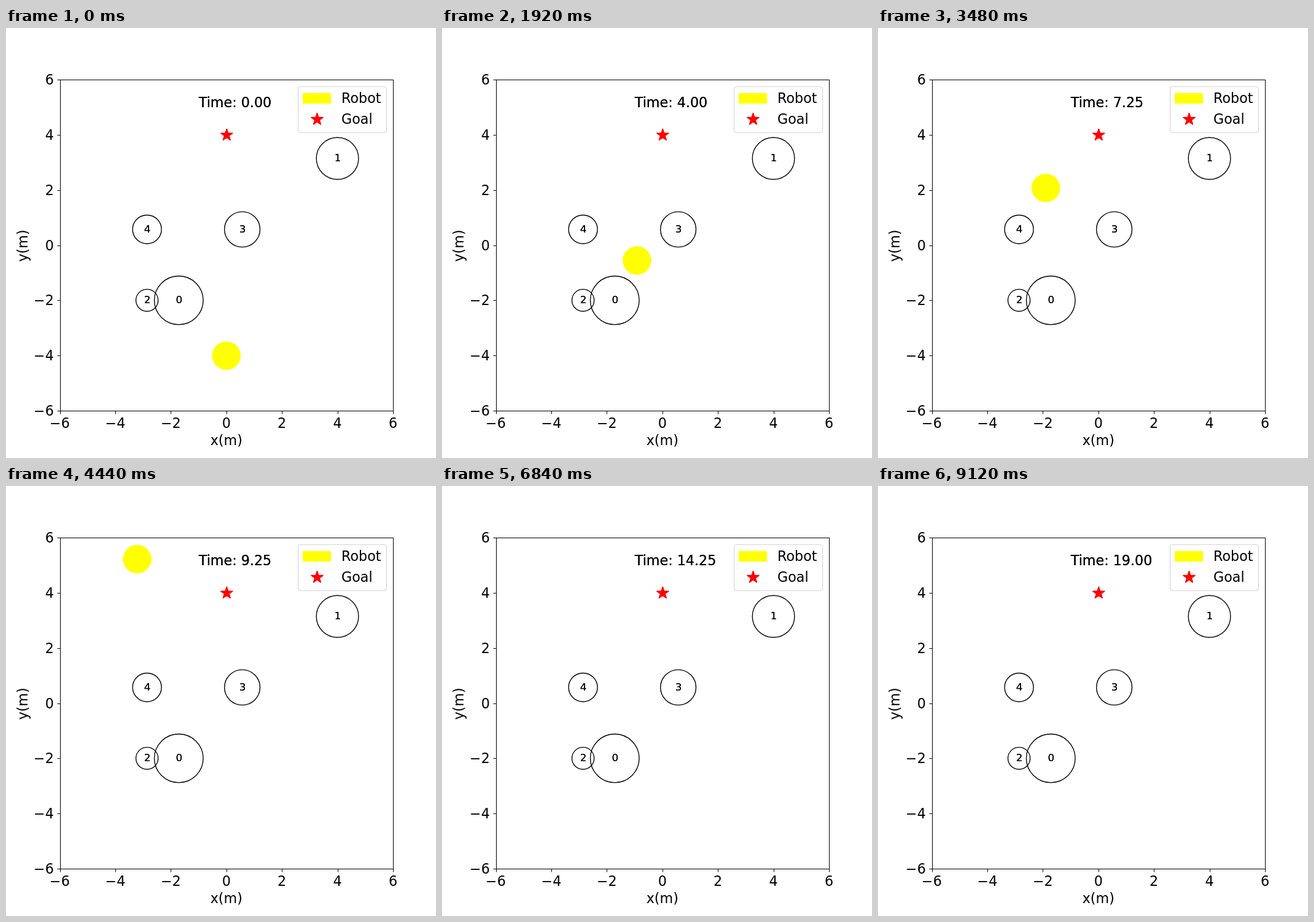
Animation of 700 by 700 pixels, one loop 9240 ms. Source, as an HTML page with a canvas:

```html
<!DOCTYPE html>
<html lang="en">
<head>
<meta charset="utf-8">
<title>Robot navigation</title>
<style>
  html, body { margin: 0; width: 100%; height: 100%; overflow: hidden; background: #fff; }
  canvas { display: block; }
</style>
</head>
<body>
<canvas id="stage" width="700" height="700"></canvas>
<script>
const ctx = document.getElementById('stage').getContext('2d');
const STEP_MS = 120, STEPS = 77, STEP_SECONDS = 0.25;
const LEFT = 87.5, TOP = 84, RIGHT = 630, BOTTOM = 623;
const SCALE_X = (RIGHT - LEFT) / 12, SCALE_Y = (BOTTOM - TOP) / 12;
const px = x => LEFT + (x + 6) * SCALE_X;
const py = y => BOTTOM - (y + 6) * SCALE_Y;
const snap = v => Math.round(v) + 0.5;

// Obstacles in metres: x, y, radius
const obstacles = [
  [-12 / 7, -2, 0.88], [4, 22 / 7, 0.76], [-20 / 7, -2, 0.4],
  [4 / 7, 4 / 7, 0.64], [-20 / 7, 4 / 7, 0.52]
];

// Robot waypoints: step, x, y in pixels
const path = [
  [0, 358.75, 533.3], [8, 358, 456.3], [9, 357, 442.5], [16, 317.3, 378.5],
  [23, 294.7, 341], [24, 289.4, 334.2], [29, 273.2, 260.4], [32, 247.3, 206.6],
  [37, 213.6, 119], [39, 209.4, 84], [40, 209, 66], [42, 208.5, 30]
];

function slope(i, axis) {
  return (path[i + 1][axis] - path[i][axis]) / (path[i + 1][0] - path[i][0]);
}

function tangent(i, axis) {
  const last = path.length - 1;
  if (i === 0) return 2 * slope(0, axis) - tangent(1, axis);
  if (i === last) return slope(last - 1, axis);
  const before = path[i][0] - path[i - 1][0], after = path[i + 1][0] - path[i][0];
  return (slope(i - 1, axis) * after + slope(i, axis) * before) / (before + after);
}

function robotAt(step) {
  const n = Math.min(step, 42);
  let i = 0;
  while (i < path.length - 2 && n >= path[i + 1][0]) i++;
  const span = path[i + 1][0] - path[i][0], u = (n - path[i][0]) / span;
  const s = u * u * (3 - 2 * u);
  return [1, 2].map(axis =>
    path[i][axis] * (1 - s) + path[i + 1][axis] * s +
    span * u * (1 - u) * ((1 - u) * tangent(i, axis) - u * tangent(i + 1, axis)));
}

function text(string, x, y, align = 'left', size = 22.22) {
  ctx.font = `${size}px "DejaVu Sans", sans-serif`;
  ctx.textAlign = align;
  ctx.fillStyle = '#000';
  ctx.fillText(string, x, y);
}

function doubleText(...args) {
  text(...args);
  text(...args);
}

function ellipse(x, y, rx, ry) {
  ctx.beginPath();
  ctx.ellipse(x, y, rx, ry, 0, 0, 2 * Math.PI);
}

function line(x1, y1, x2, y2) {
  ctx.beginPath();
  ctx.moveTo(x1, y1);
  ctx.lineTo(x2, y2);
  ctx.stroke();
}

function star(x, y) {
  ctx.beginPath();
  for (let k = 0; k < 10; k++) {
    const r = k % 2 ? 3.98 : 10.42, a = k * Math.PI / 5;
    ctx.lineTo(x + r * Math.sin(a), y - r * Math.cos(a));
  }
  ctx.closePath();
  ctx.fillStyle = ctx.strokeStyle = '#f00';
  ctx.lineWidth = 1.39;
  ctx.lineJoin = 'bevel';
  ctx.fill();
  ctx.stroke();
}

function drawAxes() {
  ctx.strokeStyle = '#000';
  ctx.lineWidth = 1;
  ctx.lineJoin = 'miter';
  ctx.strokeRect(snap(LEFT), snap(TOP), snap(RIGHT) - snap(LEFT), BOTTOM - TOP);
  for (let v = -6; v <= 6; v += 2) {
    const label = String(v).replace('-', '\u2212');
    const x = snap(px(v)), y = snap(py(v));
    line(x, 624, x, 628.5);
    line(83.5, y, 88, y);
    text(label, px(v), 651, 'center');
    text(label, 77.8, Math.round(py(v)) + 8, 'right');
  }
  text('x(m)', 358.75, 679, 'center');
  ctx.save();
  ctx.translate(35, 354.5);
  ctx.rotate(-Math.PI / 2);
  text('y(m)', 0, 0, 'center');
  ctx.restore();
}

function drawLegend() {
  ctx.beginPath();
  ctx.roundRect(475.5, 95.5, 144, 75, 4.4);
  ctx.fillStyle = 'rgba(255,255,255,0.8)';
  ctx.fill();
  ctx.strokeStyle = '#d6d6d6';
  ctx.lineWidth = 1.2;
  ctx.stroke();
  ctx.fillStyle = '#ff0';
  ctx.fillRect(483, 106, 46, 17);
  star(506.5, 148.7);
  text('Robot', 546, 122);
  text('Goal', 546, 156);
}

function draw(step) {
  ctx.fillStyle = '#fff';
  ctx.fillRect(0, 0, 700, 700);

  ctx.save();
  ctx.beginPath();
  ctx.rect(88, 84, 542, 539);
  ctx.clip();
  ellipse(...robotAt(step), 23.3, 23.15);
  ctx.fillStyle = '#ff0';
  ctx.fill();
  ctx.restore();

  obstacles.forEach(([x, y, r], i) => {
    ellipse(px(x), py(y), r * SCALE_X, r * SCALE_Y);
    ctx.strokeStyle = '#000';
    ctx.lineWidth = 1.39;
    ctx.stroke();
    doubleText(String(i), px(x) + 0.5, Math.round(py(y)) + 5, 'center', 16.67);
  });

  drawAxes();
  star(359.3, 174.3);
  doubleText('Time: ' + (step * STEP_SECONDS).toFixed(2), 313.8, 129);
  drawLegend();
}

const start = performance.now();
function tick() {
  draw(Math.floor((performance.now() - start) / STEP_MS) % STEPS);
  requestAnimationFrame(tick);
}
tick();
</script>
</body>
</html>
```
